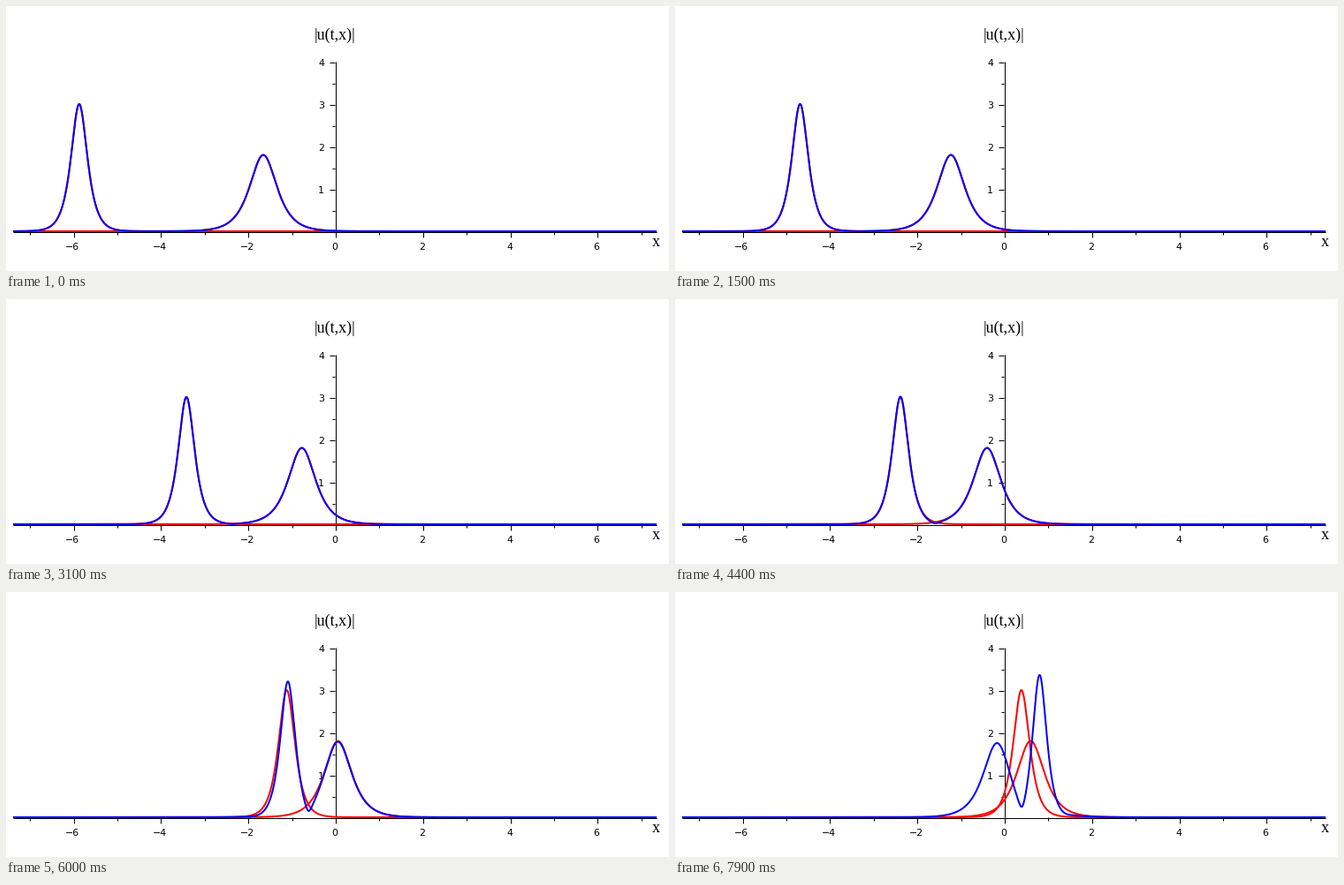
Animation of 750 by 300 pixels, one loop 8 s. Source, as a matplotlib script:

```python
import matplotlib.pyplot as plt
import numpy as np
from matplotlib.animation import FuncAnimation

W, H, DPI = 750, 300, 100
FRAMES, INTERVAL = 80, 100
PX = 72 / DPI                 # points per pixel
X0, Y0 = 372, 255             # pixel position of the plot's zero
XU, YU = 49.4, 48             # pixels per unit

K1, K2 = 6.0, 3.6             # soliton wave numbers; height k/2, speed k^2
PHASE = 0.4                   # relative phase of the two solitons
DT, MID = 0.0022, 71          # time step and step of the collision
SHIFT = np.log((K1 + K2) / (K1 - K2))

x = np.linspace(-364 / XU, 364 / XU, 1457)


def soliton(k, t, shift):
    return k / 2 / np.cosh(k * (x - k * k * t) + shift)


def collision(t):
    """Modulus of the two-soliton solution of the complex mKdV equation."""
    a, b = K1 * (x - K1**2 * t), K2 * (x - K2**2 * t)
    top = (K1**2 - K2**2) * np.abs(
        K1 * np.cosh(b) - K2 * np.cosh(a) * np.exp(1j * PHASE))
    low = ((K1 - K2)**2 * np.cosh(a + b) + (K1 + K2)**2 * np.cosh(a - b)
           - 4 * K1 * K2 * np.cos(PHASE))
    return top / low


fig = plt.figure(figsize=(W / DPI, H / DPI), dpi=DPI, facecolor="white")
ax = fig.add_axes([0, 0, 1, 1])
ax.set(xlim=(0, W), ylim=(H, 0))
ax.axis("off")


def rule(xs, ys):
    ax.plot(xs, ys, color="black", lw=PX, solid_capstyle="butt", zorder=1)


def label(px, py, s, size=11, family="DejaVu Sans", ha="center"):
    ax.text(px, py, s, fontsize=size * PX, family=family, ha=ha,
            va="baseline", color="black", zorder=1)


rule([8, 736], [Y0 + .5] * 2)
rule([X0 + .5] * 2, [63, Y0])

for n in range(-7, 8):
    px = round(X0 + n * XU) + .5
    major = n % 2 == 0
    rule([px] * 2, [Y0, Y0 + (7 if major else 4)])
    if major:
        label(px - 1, 276, str(n).replace("-", "\u2212"))

for n in range(1, 9):
    py = Y0 - n * YU / 2 + .5
    major = n % 2 == 0
    rule([366 if major else 369, X0], [py] * 2)
    if major:
        label(360, py + 4, str(n // 2), ha="right")

label(372, 38, "|u(t,x)|", 18, "Liberation Serif")
label(735.5, 272, "x", 18, "Liberation Serif")


def curve(color, z):
    line, = ax.plot([], [], color=color, lw=2 * PX, zorder=z, snap=False,
                    solid_capstyle="butt", solid_joinstyle="round")
    return line


fast, slow, both = curve("#ff0000", 2), curve("#ff0000", 3), curve("#0000ff", 4)


def update(i):
    t = (i - MID) * DT
    waves = soliton(K1, t, SHIFT), soliton(K2, t, -SHIFT), collision(t)
    for line, u in zip((fast, slow, both), waves):
        line.set_data(X0 + x * XU, Y0 - u * YU)
    return fast, slow, both


anim = FuncAnimation(fig, update, frames=FRAMES, interval=INTERVAL,
                     repeat=True, repeat_delay=0, blit=False)
plt.show()
```
